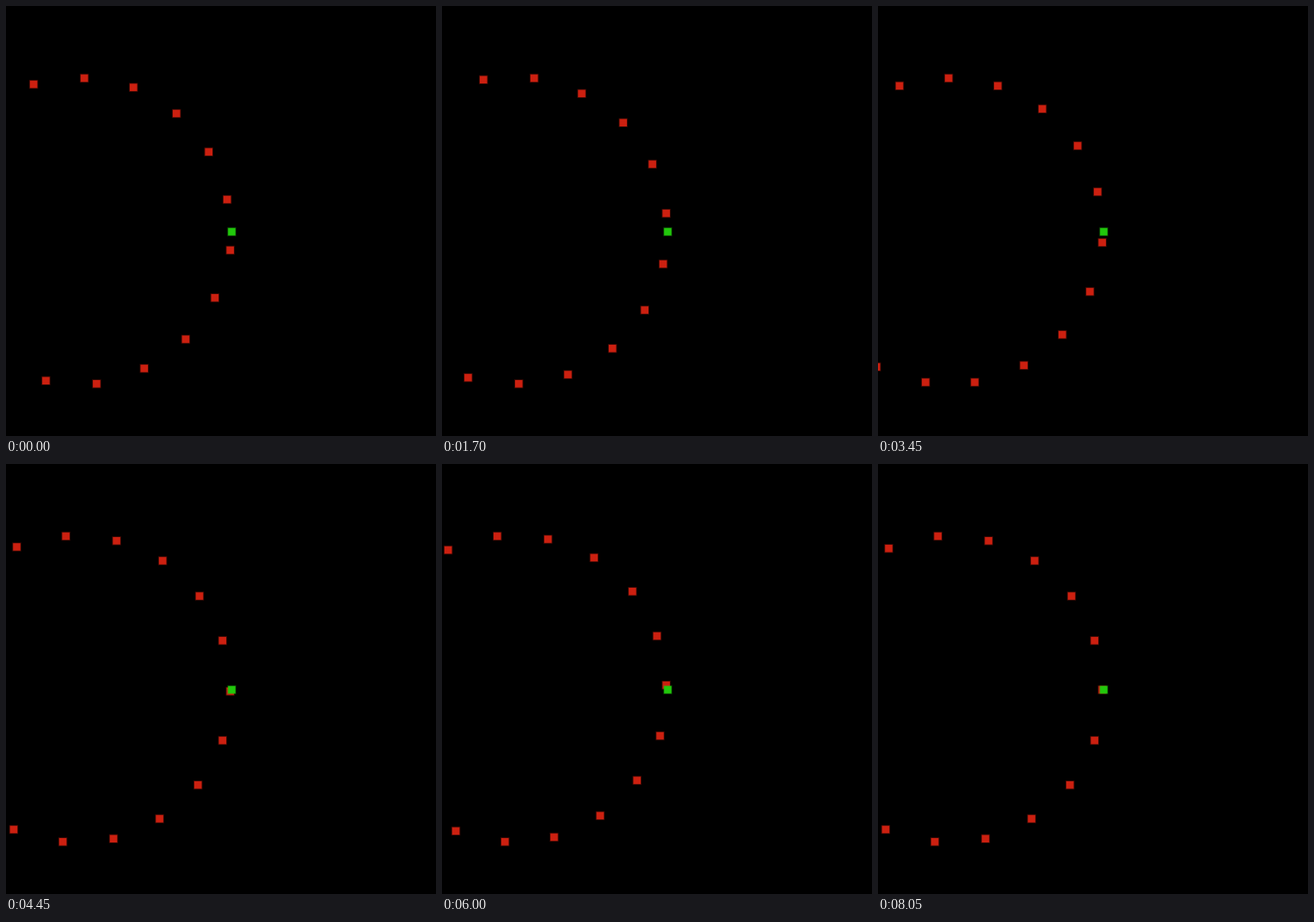
These frames come from a looping animation (500 by 500 pixels, 8.1 s). An HTML page with a canvas:

```html
<!DOCTYPE html>
<html lang="en">
<head>
<meta charset="utf-8">
<title>Dot wheel</title>
<style>
  html, body { margin: 0; width: 100%; height: 100%; overflow: hidden; background: #000; }
  canvas { display: block; width: 100vmin; height: 100vmin; }
</style>
</head>
<body>
<canvas id="stage" width="500" height="500"></canvas>
<script>
const ctx = document.getElementById('stage').getContext('2d');

const GRID = 280;              // coarse pixels across the stage
const UNIT = 500 / GRID;
const CX = 47, CY = 147, RADIUS = 100;
const DOTS = 19;
const RED = '#cc2010', GREEN = '#22c80c';
const FRAME_MS = 50, LOOP_MS = 8100;
const START_DEG = 7.14, TICK_DEG = 1.2;

// [frame, ticks turned so far]: about three ticks per frame, slightly uneven
const PACE = [[0, 0], [20, 58], [49, 143], [89, 263], [120, 356], [143, 425], [161, 484]];

function ticksAt(frame) {
  const i = Math.max(1, PACE.findIndex(([f]) => f >= frame));
  const [f0, t0] = PACE[i - 1], [f1, t1] = PACE[i];
  return Math.round(t0 + (t1 - t0) * (frame - f0) / (f1 - f0));
}

function square(x, y, size, alpha) {
  ctx.globalAlpha = alpha;
  ctx.fillRect(x - size / 2, y - size / 2, size, size);
}

// A solid core with a soft edge
function dot(x, y, color) {
  ctx.fillStyle = color;
  square(x, y, 5.8, 0.3);
  square(x, y, 4.8, 1);
}

function draw(frame) {
  ctx.setTransform(UNIT, 0, 0, UNIT, 0, 0);
  ctx.globalAlpha = 1;
  ctx.fillStyle = '#000';
  ctx.fillRect(0, 0, GRID, GRID);

  const turn = START_DEG + ticksAt(frame) * TICK_DEG;
  for (let i = 0; i < DOTS; i++) {
    const a = (turn + i * 360 / DOTS) * Math.PI / 180;
    dot(Math.floor(CX + RADIUS * Math.cos(a)), Math.floor(CY + RADIUS * Math.sin(a)), RED);
  }
  dot(CX + RADIUS, CY, GREEN);
}

const start = performance.now();
function tick() {
  const t = (performance.now() - start) % LOOP_MS;
  draw(Math.floor(t / FRAME_MS));
  requestAnimationFrame(tick);
}
tick();
</script>
</body>
</html>
```
